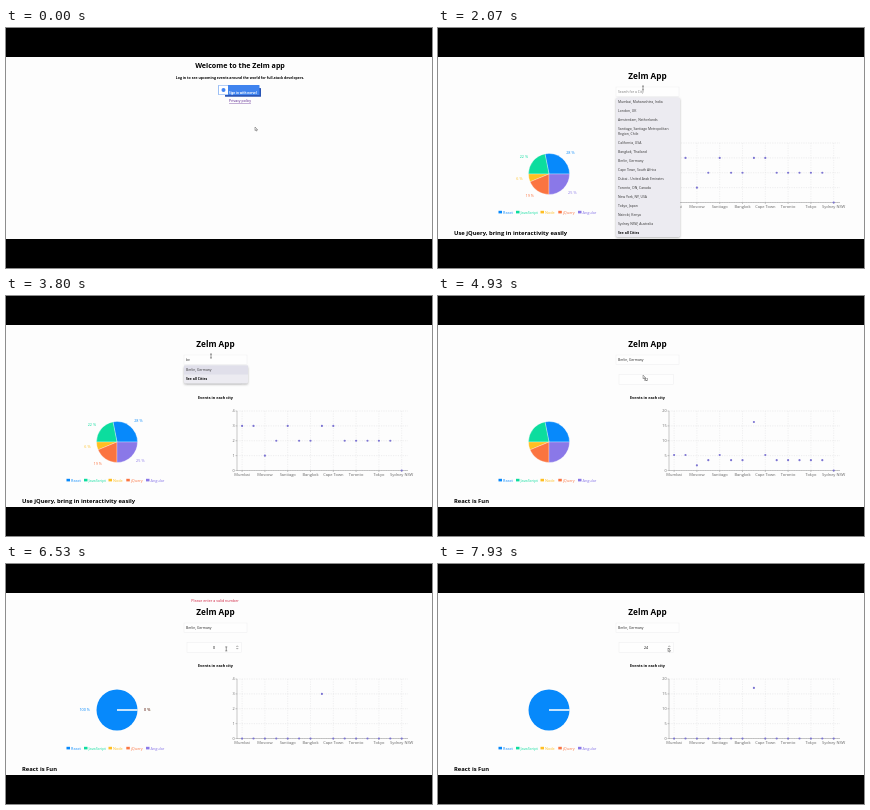
Recreate the animation shown at these times as an HTML page. Size 426 px wide and 240 px high, loop 8000 ms.

```html
<!DOCTYPE html>
<html lang="en">
<head>
<meta charset="utf-8">
<title>Event finder demo</title>
<style>
  html, body { margin: 0; width: 100%; height: 100%; overflow: hidden; background: #000; }
  svg { display: block; width: 100%; height: 100%; font-family: "Open Sans", "Noto Sans", sans-serif; }
  .panel { filter: drop-shadow(.8px 1px 1px #7778); }
</style>
</head>
<body>
<svg id="stage" viewBox="0 0 426 240"></svg>
<script>
const LOOP = 8000;
const LOGIN_END = 530, OPEN = 2070, PICK = 4670, CUT = 5600, INVALID = 6130;
const SPIN = 6750, SPIN_END = 7750, PIE_START = PICK + 400, PIE_END = 6500;

const topics = [
  { name: 'React', color: '#0789fb', count: 9, x: 60.5 },
  { name: 'JavaScript', color: '#0cdd9e', count: 7, x: 78 },
  { name: 'Node', color: '#ffbf22', count: 2, x: 102.5 },
  { name: 'jQuery', color: '#fb7440', count: 6, x: 120.3 },
  { name: 'Angular', color: '#8a78e8', count: 8, x: 140 }
];
const cities = [
  'Mumbai, Maharashtra, India', 'London, UK', 'Amsterdam, Netherlands',
  'Santiago, Santiago Metropolitan|Region, Chile', 'California, USA', 'Bangkok, Thailand',
  'Berlin, Germany', 'Cape Town, South Africa', 'Dubai - United Arab Emirates',
  'Toronto, ON, Canada', 'New York, NY, USA', 'Tokyo, Japan', 'Nairobi, Kenya',
  'Sydney NSW, Australia'
];
const axisCities = ['Mumbai', 'Moscow', 'Santiago', 'Bangkok', 'Cape Town', 'Toronto', 'Tokyo', 'Sydney NSW'];
const perCity = [3, 3, 1, 2, 3, 2, 2, 3, 3, 2, 2, 2, 2, 2, 0];
const BERLIN = 7, BERLIN_TOTAL = 17;

// time, text in the city field
const typing = [[0, ''], [2330, 'x'], [2530, 'xx'], [2930, 'x'], [3070, ''], [3400, 'b'], [3600, 'be'], [PICK, 'Berlin, Germany']];
// time, x, y
const mousePath = [
  [0, 249, 99], [200, 249, 99], [430, 238, 63], [750, 238, 63], [1250, 342, 127], [1450, 342, 127],
  [1900, 205, 60], [4200, 205, 60], [4550, 204, 74], [4700, 204, 74], [4900, 205, 79],
  [5200, 207, 83], [6200, 207, 83], [6480, 219, 85], [6720, 230, 84], [LOOP, 230, 84]
];

const clamp = v => Math.max(0, Math.min(1, v));
const mix = (a, b, p) => a + (b - a) * p;
const progress = (t, from, to) => clamp((t - from) / (to - from));
const smooth = p => p * p * (3 - 2 * p);
const latest = (steps, t) => steps.filter(s => s[0] <= t).pop();

const text = (x, y, size, str, { fill = '#000', bold = false, anchor = 'start', more = '' } = {}) =>
  `<text x="${x}" y="${y}" font-size="${size}" fill="${fill}" text-anchor="${anchor}"${bold ? ' font-weight="700"' : ''} ${more}>${str}</text>`;
const rect = (x, y, w, h, fill, more = '') =>
  `<rect x="${x}" y="${y}" width="${w}" height="${h}" fill="${fill}" ${more}/>`;
const line = (x1, y1, x2, y2, color, more = '') =>
  `<path d="M${x1} ${y1}L${x2} ${y2}" stroke="${color}" stroke-width=".4" ${more}/>`;

function login() {
  const middle = { bold: true, anchor: 'middle' };
  return text(234, 40, 7.1, 'Welcome to the Zelm app', middle) +
    text(234, 50.8, 3.53, 'Log in to see upcoming events around the world for full-stack developers.', middle) +
    rect(219, 60, 36, 8.8, '#2a55b5', 'rx=".6"') +
    rect(212.5, 57, 41, 10, '#3f83ee', 'rx=".6"') +
    rect(213, 57.4, 9, 9.2, '#fff') +
    '<circle cx="217.5" cy="62" r="2" fill="#4285f4"/>' +
    text(223, 65.6, 3, 'Sign in with norvel', { fill: '#fff', bold: true }) +
    text(234, 74, 3.5, 'Privacy policy', { fill: '#551a8b', anchor: 'middle', more: 'text-decoration="underline"' });
}

function pie(t) {
  const cx = 111, cy = 146, r = 20.5;
  const p = smooth(progress(t, PIE_START, PIE_END));
  const labelled = t < PICK || (t >= PIE_END && t < SPIN);
  const at = (turn, radius) => {
    const a = turn * 2 * Math.PI;
    return [cx + radius * Math.cos(a), cy - radius * Math.sin(a)];
  };
  let turn = 0, slices = '', labels = '';
  topics.forEach(({ color, count }, i) => {
    const share = mix(count / 32, i ? 0 : 1, p);
    const end = turn + share;
    slices += share > .999
      ? `<circle cx="${cx}" cy="${cy}" r="${r}" fill="${color}"/>` + line(cx, cy, cx + r, cy, '#fff')
      : `<path d="M${cx} ${cy}L${at(turn, r)}A${r} ${r} 0 ${+(share > .5)} 0 ${at(end, r)}Z" fill="${color}" stroke="#fff" stroke-width=".3"/>`;
    const [x, y] = at(turn + share / 2, 27);
    if (labelled) labels += text(x, y + 1, 3.8, `${Math.round(share * 100)} %`, { fill: color, anchor: x > cx ? 'start' : 'end' });
    turn = end;
  });
  const legend = topics.map(({ name, color, x }) =>
    rect(x, 182.8, 3.5, 2.6, color) + text(x + 4.6, 185.5, 3.8, name, { fill: color })).join('');
  return slices + labels + legend;
}

function scatter(t, count) {
  const left = 231, right = 402, top = 115, bottom = 174.5;
  const step = (right - left) / perCity.length;
  const found = Math.min(count, BERLIN_TOTAL);
  const max = t < PICK ? 4 : Math.max(4, Math.ceil(found / 4) * 4);
  const height = (value, limit) => bottom - (bottom - top) * value / limit;
  const dash = 'stroke-dasharray="1.2 1.2"';
  let out = '';
  for (let i = 0; i <= 4; i++) {
    const y = height(i, 4);
    out += line(left, y, right, y, '#d4d4d6', dash) + line(left - 1.5, y, left, y, '#777') +
      text(left - 2.3, y + 1.3, 3.8, max * i / 4, { fill: '#666', anchor: 'end' });
  }
  const xAt = i => left + step * (i + .5) - .6;
  axisCities.forEach((name, i) => {
    const x = xAt(i * 2);
    out += line(x, top, x, bottom, '#dcdcdf', dash) + line(x, bottom, x, bottom + 1.5, '#777') +
      text(x, 180, 4, name, { fill: '#666', anchor: 'middle' });
  });
  out += line(left, top, left, bottom, '#777') + line(left, bottom, right, bottom, '#777');
  perCity.forEach((value, i) => {
    const before = height(value, 4);
    const picked = i === BERLIN ? height(BERLIN_TOTAL, 20) : bottom;
    let y = mix(before, picked, progress(t, PICK, PICK + 400));
    if (t >= CUT && i === BERLIN) y = mix(picked, height(3, 4), progress(t, CUT, CUT + 400));
    if (t >= SPIN && i === BERLIN) y = height(found, max);
    out += `<circle cx="${xAt(i)}" cy="${y}" r="1.1" fill="#7c74d2"/>`;
  });
  return out;
}

function suggestions(query) {
  const matches = cities.filter(c => c.toLowerCase().includes(query));
  const shown = matches.length ? matches : cities;
  let y = 75.2, rows = '';
  for (const city of shown) {
    for (const [i, part] of city.split('|').entries()) {
      if (i) y += 4.6;
      rows += text(180, y, 3.4, part, { fill: '#333' });
    }
    y += 9;
  }
  rows += text(180, y, 3.4, 'See all Cities', { bold: true });
  const first = shown.length === 1 ? rect(178, 69.5, 64, 9, '#e0dfea') : '';
  return rect(178, 69.5, 64, y - 66.2, '#ecebf1', 'rx="1.5" class="panel"') + first + rows;
}

function fieldValue(t) {
  if (t < 5470) return 32;
  if (t < INVALID) return 3;
  return Math.round(24 * progress(t, SPIN, SPIN_END));
}

function home(t) {
  const query = latest(typing, t)[1];
  const value = fieldValue(t);
  const count = t < CUT ? 32 : value || 3;
  const middle = { anchor: 'middle' };
  const edge = 'stroke="#eeeef0" stroke-width=".5"';
  let out = text(209.5, 51, 8.2, 'Zelm App', { bold: true, anchor: 'middle' }) +
    rect(178, 59, 63, 9.5, '#fefefe', edge) +
    text(180, 64.8, 3.4, query || 'Search for a City', { fill: query ? '#222' : '#777' }) +
    rect(181, 78.5, 54.5, 10, '#fefefe', edge) +
    text(208, 84.8, 3.6, value, middle) +
    text(209.5, 103.3, 3.8, 'Events in each city', { bold: true, anchor: 'middle' }) +
    pie(t) + scatter(t, count) +
    text(16, 206.5, 5.85, t < PICK ? 'Use jQuery, bring in interactivity easily' : 'React is Fun', { bold: true });
  if (t > 6270) out += '<path d="M230.4 82.9l.9-1.1.9 1.1M230.4 84l.9 1.1.9-1.1" fill="none" stroke="#555" stroke-width=".5"/>';
  if (t >= OPEN && t < PICK) out += suggestions(query);
  if (query.startsWith('x')) {
    out += text(231, 38.4, 3.55, 'We can not find the city you are looking for. Please try another city', { fill: '#4040a8', anchor: 'middle' });
  }
  if (t >= INVALID && !value) {
    out += text(209, 38.4, 3.65, 'Please enter a valid number', { fill: '#d0213f', anchor: 'middle' });
  }
  return out;
}

function mouse(t) {
  const from = latest(mousePath, t);
  const to = mousePath[mousePath.indexOf(from) + 1] || from;
  const p = to === from ? 0 : smooth(progress(t, from[0], to[0]));
  const x = mix(from[1], to[1], p), y = mix(from[2], to[2], p);
  const beam = (t > 1850 && t < 4300) || (t > 5000 && t < 6650);
  const shape = beam
    ? '<path d="M-1-2H1M0-2V2M-1 2H1" fill="none" stroke="#333" stroke-width=".5"/>'
    : '<path d="M0 0V3.6L.9 2.8 1.5 4.1 2.1 3.8 1.5 2.6H2.6Z" fill="#fff" stroke="#333" stroke-width=".4"/>';
  return `<g transform="translate(${x} ${y})">${shape}</g>`;
}

const stage = document.getElementById('stage');
function render() {
  const t = performance.now() % LOOP;
  stage.innerHTML = rect(0, 0, 426, 240, '#000') + rect(0, 29, 426, 182, '#fdfdfd') +
    (t < LOGIN_END ? login() : home(t)) + mouse(t);
  requestAnimationFrame(render);
}
render();
</script>
</body>
</html>
```
